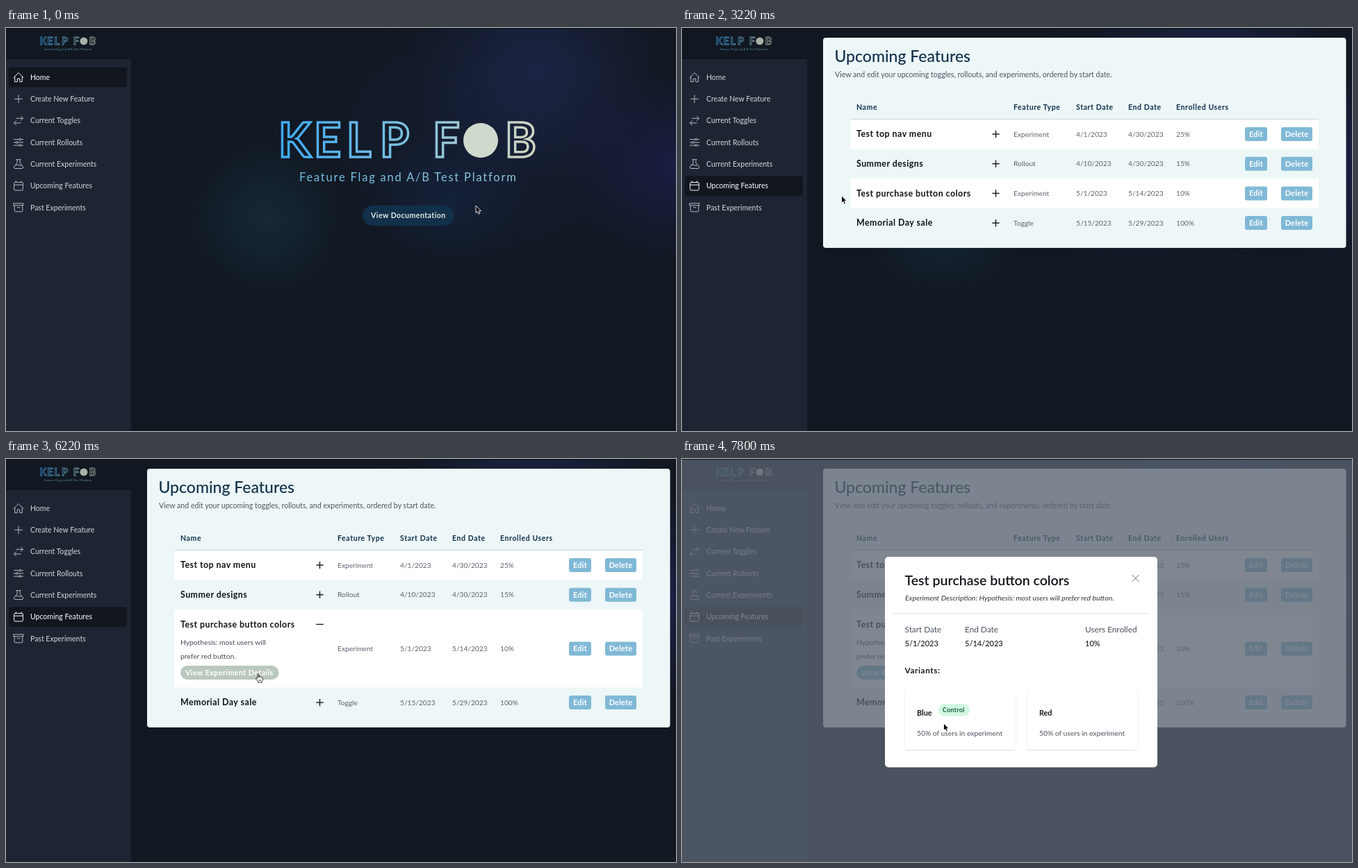
Write an HTML page that moves like this. It is 964 px wide and 581 px high and loops after 8000 ms.

```html
<!DOCTYPE html>
<html lang="en">
<head>
<meta charset="utf-8">
<title>Upcoming features</title>
<style>
html, body { margin: 0; width: 100%; height: 100%; overflow: hidden; background: #111821; }
svg { display: block; width: 964px; height: 581px; font-family: Lato, "Open Sans", sans-serif; }
text { white-space: pre; }
.nav { font-size: 10.5px; fill: #d3d7db; }
.nav.on { fill: #fff; }
.icon { fill: none; stroke: #b4b9c0; stroke-width: 1; stroke-linecap: round; stroke-linejoin: round; }
.icon.on { stroke: #f2f4f6; }
.brand { font-size: 68px; font-weight: 700; fill: none; stroke: url(#brandInk); stroke-width: 3.5; }
.tag { font-size: 16.5px; letter-spacing: 1.8px; fill: url(#tagInk); }
.docs { font-size: 10.6px; font-weight: 700; letter-spacing: .43px; fill: #e2ebe4; }
.title { font-size: 23px; font-weight: 500; fill: #12304a; }
.sub { font-size: 10.6px; fill: #4b5761; }
.head { font-size: 10.5px; font-weight: 700; letter-spacing: .6px; fill: #12304a; }
.name { font-size: 12.4px; font-weight: 700; letter-spacing: .47px; fill: #0f1318; }
.cell { font-size: 10.2px; fill: #5a636d; }
.note { font-size: 10.3px; fill: #434c56; }
.btn { font-size: 10.8px; font-weight: 700; letter-spacing: .25px; fill: #fff; text-anchor: middle; }
.more { font-size: 10.6px; font-weight: 700; letter-spacing: .46px; fill: #fff; }
.sign { stroke: #14181d; stroke-width: 1.4; }
.mTitle { font-size: 19.5px; font-weight: 600; fill: #101419; }
.mDesc { font-size: 10.45px; font-style: italic; fill: #2f353c; }
.mLabel { font-size: 11.8px; fill: #4a525c; }
.mValue { font-size: 11px; font-weight: 500; fill: #15191e; }
.mHead { font-size: 11.8px; font-weight: 700; letter-spacing: .6px; fill: #15191e; }
.mName { font-size: 10.8px; font-weight: 700; fill: #15191e; }
.mNote { font-size: 10.3px; fill: #4a525c; }
.pill { font-size: 9.2px; font-weight: 700; letter-spacing: .15px; fill: #17623a; }
</style>
</head>
<body>
<svg id="stage" viewBox="0 0 964 581" xmlns="http://www.w3.org/2000/svg"></svg>
<script>
const LOOP = 8000;
const PAGE_AT = 1940, EXPAND_AT = 5040;
const GROW = 70, ROW_H = 42.7;
const BLUE = '#80b9d6', SAGE = '#bac8bd';

const text = (cls, x, y, s) => `<text class="${cls}" x="${x}" y="${y}">${s}</text>`;
const box = (x, y, w, h, r, fill, extra = '') =>
  `<rect x="${x}" y="${y}" width="${w}" height="${h}" rx="${r}" fill="${fill}" ${extra}/>`;

// Background glows: centre, radii, colour
const glows = [
  [690, 160, 260, 200, '#151d33'],
  [765, 60, 185, 165, '#1c2445'],
  [964, 200, 165, 140, '#1b1f45'],
  [375, 275, 115, 115, '#152a38'],
  [640, 245, 120, 95, '#15223a']
];
const glowDefs = glows.map((g, i) => `<radialGradient id="glow${i}">
  <stop offset="0" stop-color="${g[4]}" stop-opacity=".9"/>
  <stop offset=".5" stop-color="${g[4]}" stop-opacity=".5"/>
  <stop offset="1" stop-color="${g[4]}" stop-opacity="0"/></radialGradient>`).join('');
const backdrop = box(0, 0, 964, 581, 0, '#111821') + glows.map(([x, y, rx, ry], i) =>
  `<ellipse cx="${x}" cy="${y}" rx="${rx}" ry="${ry}" fill="url(#glow${i})"/>`).join('');

const brand = `<g id="brand">
  <text class="brand" x="392 443 490 538" y="186">KELP</text>
  <text class="brand" x="614" y="186">F</text>
  <circle cx="683" cy="162" r="25" fill="#cfd9cc"/>
  <text class="brand" x="718" y="186">B</text>
  ${text('tag', 422, 221, 'Feature Flag and A/B Test Platform')}</g>`;

// Sidebar: label and icon path around the icon centre
const items = [
  ['Home', 'M-7 .5L0-6.5 7 .5M-5.3-1V6.5H-1.7V2H1.7V6.5H5.3V-1'],
  ['Create New Feature', 'M0-5.5V5.5M-5.5 0H5.5'],
  ['Current Toggles', 'M-3.3 6.5L-6.5 3.3-3.3 .2M-6.5 3.3H3.2M3.3-6.5L6.5-3.3 3.3-.2M6.5-3.3H-3.2'],
  ['Current Rollouts', 'M-6.5-4.3H.8M3.6-4.3H6.5M-6.5 0H-3.6M-.8 0H6.5M-6.5 4.3H.8M3.6 4.3H6.5' +
    'M.8-4.3a1.4 1.4 0 1 0 2.8 0a1.4 1.4 0 1 0-2.8 0M-3.6 0a1.4 1.4 0 1 0 2.8 0a1.4 1.4 0 1 0-2.8 0' +
    'M.8 4.3a1.4 1.4 0 1 0 2.8 0a1.4 1.4 0 1 0-2.8 0'],
  ['Current Experiments', 'M-3.2-6.5H3.2M-2-6.5V-1.5L-6.5 3.8Q-7.3 6 -5 6.3H5Q7.3 6 6.5 3.8L2-1.5V-6.5M-4.5 1.5Q-2 .3 0 1.5T4.5 1.5'],
  ['Upcoming Features', 'M-6.4-3.5Q-6.4-5-5-5H5Q6.4-5 6.4-3.5V5Q6.4 6.5 5 6.5H-5Q-6.4 6.5-6.4 5ZM-6.4-1.3H6.4M-3.7-6.8V-5M3.7-6.8V-5'],
  ['Past Experiments', 'M-6.8-6H6.8V-3H-6.8ZM-5.8-3V4.8Q-5.8 6-4.6 6H4.6Q5.8 6 5.8 4.8V-3M-1.8 0H1.8']
];
const itemY = i => 71 + i * 31.3;
const sidebar = box(0, 45, 180, 536, 0, '#1e2532') +
  '<use href="#brand" opacity=".8" transform="translate(-37.7 -16.6) scale(.219)"/>' +
  items.map(([label, d], i) => `<g id="item${i}">
    ${box(4, itemY(i) - 14.2, 170, 28.4, 4, 'none')}
    <path class="icon" transform="translate(18 ${itemY(i)})" d="${d}"/>
    ${text('nav', 35, itemY(i) + 3.8, label)}</g>`).join('');

const hero = `<g id="hero">${brand}${box(513, 256, 132, 29, 14.5, '#12304a')}
  ${text('docs', 525, 274, 'View Documentation')}</g>`;

// Feature table
const rows = [
  ['Test top nav menu', 'Experiment', '4/1/2023', '4/30/2023', '25%'],
  ['Summer designs', 'Rollout', '4/10/2023', '4/30/2023', '15%'],
  ['Test purchase button colors', 'Experiment', '5/1/2023', '5/14/2023', '10%'],
  ['Memorial Day sale', 'Toggle', '5/15/2023', '5/29/2023', '100%']
];
const colX = [251, 477, 567, 642, 711];
const heads = ['Name', 'Feature Type', 'Start Date', 'End Date', 'Enrolled Users'];
const button = (x, y, w, s) => box(x, y - 10, w, 20, 3, BLUE) + text('btn', x + w / 2, y + 3.8, s);
const row = ([name, ...cells], i) => {
  const y = 153 + i * ROW_H;
  return `<g id="row${i}">
    ${i % 2 ? '' : box(242, y - 21.5, 674, ROW_H, 0, '#fff', `id="bg${i}"`)}
    ${text('name', 251, y + 4.3, name)}
    <path class="sign" d="M446.3 ${y}h10.4"/>
    <path class="sign" id="bar${i}" d="M451.5 ${y - 5.2}v10.4"/>
    <g id="cells${i}">${cells.map((c, k) => text('cell', colX[k + 1], y + 3.6, c)).join('')}
    ${button(810, y, 32, 'Edit')}${button(862, y, 45, 'Delete')}</g></g>`;
};
const card = `<g id="card">${box(203, 14, 752.5, 303, 4, '#edf7f8', 'id="panel"')}
  ${text('title', 219.5, 49.3, 'Upcoming Features')}
  ${text('sub', 220, 70.5, 'View and edit your upcoming toggles, rollouts, and experiments, ordered by start date.')}
  ${heads.map((h, i) => text('head', colX[i], 117.6, h)).join('')}
  ${rows.map(row).join('')}
  ${box(242, 131, 674, 1, 0, '#cdd8dc')}
  <g id="details">${text('note', 251, 267.5, 'Hypothesis: most users will')}
  ${text('note', 251, 287.5, 'prefer red button.')}
  ${box(251, 298, 141.5, 20, 10, BLUE, 'id="view"')}
  ${text('more', 258, 311.6, 'View Experiment Details')}</g></g>`;

const variant = (x, w, name) => box(x, 332, w, 87, 4, '#fff', 'filter="url(#lift)"') +
  text('mName', x + 17, 370, name) + text('mNote', x + 17, 398.5, '50% of users in experiment');
const fact = (x, label, value) => text('mLabel', x, 249.7, label) + text('mValue', x, 269.5, value);
const modal = `<g id="modal">${box(292, 141, 392, 303.5, 5, '#fff')}
  ${text('mTitle', 320.5, 181.7, 'Test purchase button colors')}
  <path d="M647.5 167l10 10m0-10l-10 10" stroke="#6b7280" fill="none"/>
  ${text('mDesc', 321, 203.5, 'Experiment Description: Hypothesis: most users will prefer red button.')}
  ${box(304, 222, 368, 1, 0, '#dfe2e6')}
  ${fact(320.5, 'Start Date', '5/1/2023')}${fact(407, 'End Date', '5/14/2023')}${fact(580, 'Users Enrolled', '10%')}
  ${text('mHead', 320.5, 309.3, 'Variants:')}
  ${variant(321, 159, 'Blue')}${variant(497, 158.5, 'Red')}
  ${box(369, 353, 45, 17.5, 8.75, '#d3f8e1')}${text('pill', 374.8, 365, 'Control')}</g>`;

const cursors = `<g id="cursor">
  <path id="arrow" d="M0 0V10.6L2.4 8.4 4 12.2 5.9 11.4 4.3 7.7H7.5Z" fill="#000" stroke="#fff" stroke-width=".9"/>
  <path id="hand" d="M-1.1 .9Q-1-.3 0-.3T1.1 .9V4.2Q2-.1 0 3.9Q2 3.2 2.7 4.4Q4.2 3.8 4.7 5Q6.3 4.8 6.3 6.4V8.2Q6.3 9.4 5.3 10.4V12H-.4V10.7L-3.3 7.3Q-3.9 6.1-2.8 5.8-2 5.7-1.1 6.8ZM1.3 8V10M3.3 8V10"
    fill="#fff" stroke="#000" stroke-width=".8" stroke-linejoin="round"/></g>`;

stage.innerHTML = `<defs>${glowDefs}
  <linearGradient id="brandInk" gradientUnits="userSpaceOnUse" x1="396" y1="0" x2="761" y2="0">
    <stop offset="0" stop-color="#3fa9f5"/><stop offset=".5" stop-color="#7cbfdc"/>
    <stop offset="1" stop-color="#d3d6c0"/></linearGradient>
  <linearGradient id="tagInk" gradientUnits="userSpaceOnUse" x1="422" y1="0" x2="735" y2="0">
    <stop offset="0" stop-color="#70bbe6"/><stop offset="1" stop-color="#8dc7d8"/></linearGradient>
  <filter id="lift" x="-5%" y="-5%" width="110%" height="115%">
    <feDropShadow dx="0" dy="1" stdDeviation="1" flood-opacity=".14"/></filter></defs>
  ${backdrop}${hero}${sidebar}${card}
  ${box(0, 0, 964, 581, 0, '#5a6371', 'id="shade"')}${modal}
  ${box(0, 0, 964, 1, 0, '#080b10')}${cursors}`;

const el = id => document.getElementById(id);
const set = (id, name, value) => el(id).setAttribute(name, value);
const show = (id, on) => set(id, 'visibility', on ? 'visible' : 'hidden');

// Pointer legs: start, end, number of steps, target x, target y
const legs = [
  [110, 360, 4, 261, 263],
  [780, 1340, 8, 107, 230],
  [2730, 3470, 10, 282, 243],
  [3560, 3560, 1, 279, 243],
  [3890, 4620, 10, 450, 243],
  [4700, 4780, 2, 451, 240],
  [5730, 6220, 7, 363, 310],
  [7470, 7800, 5, 376.5, 381]
];
function pointer(t) {
  let x = 676, y = 256;
  for (const [from, to, n, tx, ty] of legs) {
    if (t < from) break;
    const step = n > 1 ? Math.floor((t - from) * (n - 1) / (to - from) + .2) + 1 : 1;
    const k = Math.min(1, step / n);
    x += (tx - x) * k;
    y += (ty - y) * (1 - (1 - k) ** 2);
  }
  return [x, y];
}

// Modal entry: time, progress
const entry = [[6980, .72], [7060, .9], [7140, .98], [7220, 1]];

function render(t) {
  const [x, y] = pointer(t);
  const within = (l, top, r, b) => x >= l && x <= r && y >= top && y <= b;
  const paged = t >= PAGE_AT, open = t >= EXPAND_AT;
  const active = paged ? 5 : 0;

  show('hero', !paged);
  show('card', paged);
  let overNav = false;
  items.forEach((_, i) => {
    const over = within(4, itemY(i) - 14.3, 174, itemY(i) + 14.3);
    overNav = overNav || over;
    const [bg, icon, label] = el('item' + i).children;
    bg.setAttribute('fill', i === active ? '#11161f' : over ? '#2f3946' : 'none');
    icon.classList.toggle('on', i === active || over);
    label.classList.toggle('on', i === active || over);
  });

  set('panel', 'height', 303 + (open ? GROW : 0));
  set('bg2', 'height', ROW_H + (open ? GROW : 0));
  set('cells2', 'transform', `translate(0 ${open ? GROW / 2 : 0})`);
  set('row3', 'transform', `translate(0 ${open ? GROW : 0})`);
  show('details', open);
  show('bar2', paged && !open);

  const overSign = paged && within(444, 230, 459, 246);
  const overView = open && within(251, 298, 392, 318);
  set('view', 'fill', overView ? SAGE : BLUE);

  const p = entry.reduce((v, [at, k]) => t >= at ? k : v, 0);
  set('shade', 'opacity', .77 * p);
  set('modal', 'opacity', p);
  set('modal', 'transform', `translate(488 292.7) scale(${.95 + .05 * p}) translate(-488 -292.7)`);

  const hand = overNav || overSign || overView;
  set('cursor', 'transform', `translate(${x} ${y})`);
  show('hand', hand);
  show('arrow', !hand);
}

function tick() {
  render(performance.now() % LOOP);
  requestAnimationFrame(tick);
}
tick();
</script>
</body>
</html>
```
